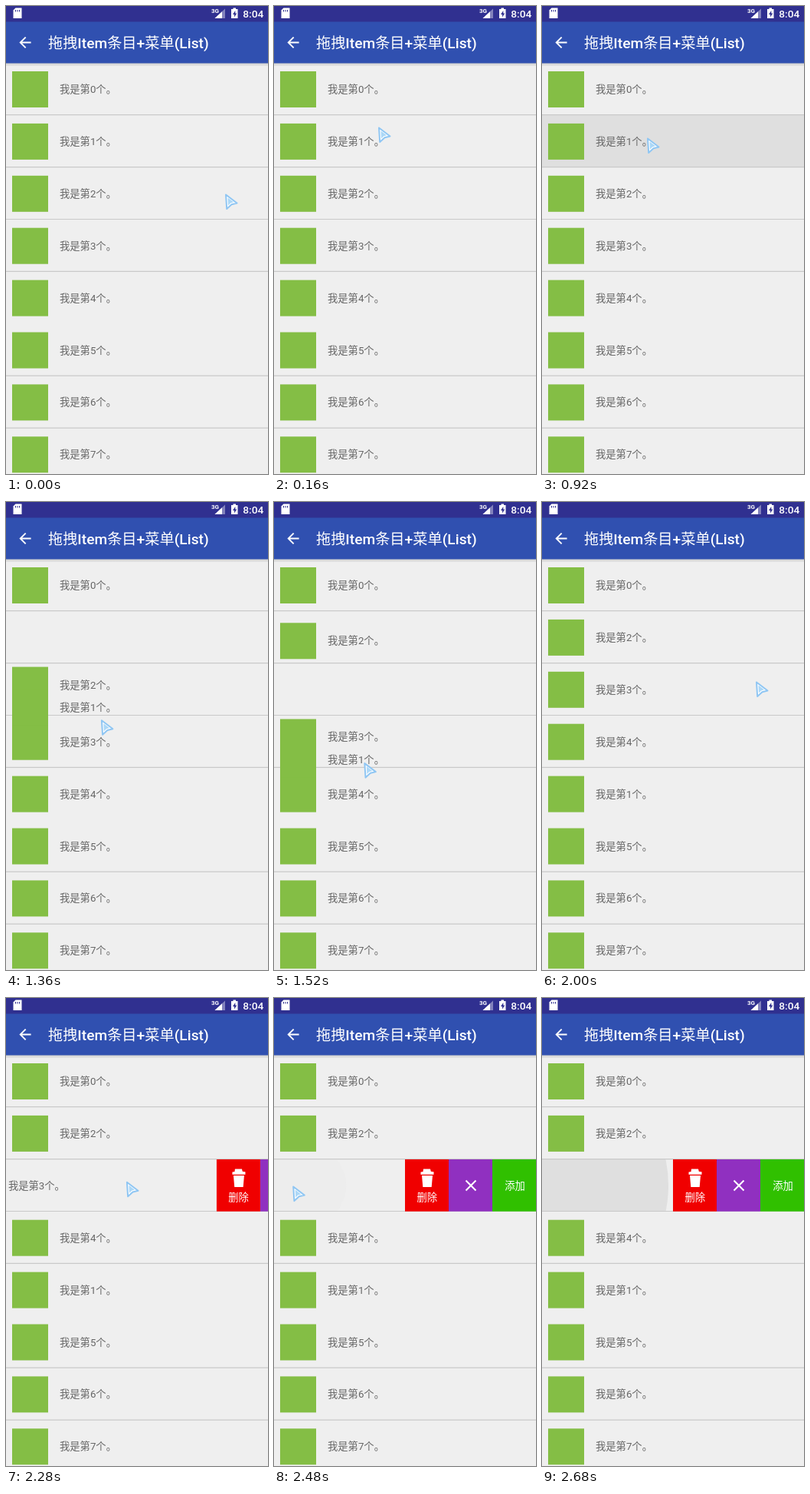
An HTML page for the animation above (3 s loop, 342 px wide and 609 px high).

```html
<!DOCTYPE html>
<html lang="zh-CN">
<head>
<meta charset="utf-8">
<style>
  html, body { margin: 0; width: 100%; height: 100%; overflow: hidden; background: #efefef; }
  svg { display: block; font-family: Roboto, "Noto Sans CJK SC", "Noto Sans CJK JP", sans-serif; }
  .white { fill: #fff; }
  .label { font-size: 13.3px; text-anchor: middle; fill: #fff; }
  #rows text { font-size: 13.3px; fill: #666; }
</style>
</head>
<body>
<svg width="342" height="609" viewBox="0 0 342 609">
  <defs>
    <linearGradient id="shade" x2="0" y2="1">
      <stop stop-color="#cfcfcf"/><stop offset="1" stop-color="#e4e4e4"/>
    </linearGradient>
    <clipPath id="row1"><rect y="141" width="342" height="69"/></clipPath>
    <clipPath id="row2"><rect y="210" width="342" height="67"/></clipPath>
  </defs>
  <rect width="342" height="609" fill="#efefef"/>
  <g fill="#dfdfdf">
    <g clip-path="url(#row1)"><circle id="press" cy="176"/></g>
    <g clip-path="url(#row2)"><circle id="tap" cy="244"/></g>
  </g>
  <path id="lines" stroke="#c9c9c9" stroke-width="1.2"/>

  <g id="menu">
    <rect width="57" height="67.700" y="210" fill="#f00000"/>
    <rect width="57" height="67.700" y="210" x="57" fill="#9030c0"/>
    <rect width="57" height="67.700" y="210" x="114" fill="#30c000"/>
    <path class="white" d="M24 222.500h9l.8 3.200 3.700.6v3.400H20.500v-3.200l3-.6zM22 231h14l-1.300 15H23.300z"/>
    <text class="label" x="28.700" y="264">删除</text>
    <path d="M79.500 237.500l13 13m0-13l-13 13" stroke="#fff" stroke-width="2"/>
    <text class="label" x="143.500" y="249">添加</text>
  </g>

  <g id="rows"></g>

  <rect y="74" width="342" height="4" fill="url(#shade)"/>
  <rect y="20" width="342" height="54.500" fill="#3050b0"/>
  <rect width="342" height="20.500" fill="#303090"/>
  <g class="white">
    <path d="M12.500 2.500H20.500V16H9.500V5.500z"/>
    <path d="M12.500 5v2.500m2.500-2.500v2.500m2.500-2.500v2.500" stroke="#303090"/>
    <text x="268" y="9" font-size="8" font-weight="700">3G</text>
    <path d="M286 3.500V16H272.500z" fill-opacity=".4"/>
    <path d="M282 7.300V16H272.500z"/>
    <path d="M296.500 2.500h3.500v1.500h2.500V16h-8.500V4h2.500z"/>
    <path d="M299.300 6l-3.300 5h2v3.500l3.300-5h-2z" fill="#303090"/>
    <text x="309.300" y="14.500" font-size="13.700" font-weight="500">8:04</text>
    <path transform="translate(13.600 36.100) scale(.95)" d="M20 11H7.830l5.590-5.590L12 4l-8 8 8 8 1.410-1.410L7.830 13H20z"/>
    <text x="55" y="55" font-size="19.200" font-weight="500">拖拽Item条目+菜单(List)</text>
  </g>

  <g id="cursor" stroke-linejoin="round">
    <path d="M1 1.500L15.500 12.500 8.500 14.200 2.200 20z" fill="#fff" stroke="#8fc6f3" stroke-width="2"/>
    <path d="M3.500 5.500L11 11.300 7 12.500 4 15.500z" fill="#acd8f7"/>
  </g>
</svg>
<script>
const $ = id => document.getElementById(id);
const PITCH = 67.9, LOOP = 3000, STEP = 40;
const DRAG_START = 1146, SWAP_EVERY = 160, SETTLE = 250, DROP = 1720;

// The divider below row 4 is absent.
let lines = '';
for (let i = 0; i < 7; i++) if (i !== 4) lines += `M0 ${141.7 + PITCH * i}h342`;
$('lines').setAttribute('d', lines);

// Each row is drawn around its own vertical centre; the dragged row 1 lies on top.
const rows = [];
for (const i of [0, 2, 3, 4, 5, 6, 7, 1]) {
  $('rows').insertAdjacentHTML('beforeend',
    `<g><rect x="8" y="-23" width="47" height="47" fill="#84be45"/><text x="70" y="5">我是第${i}个。</text></g>`);
  rows[i] = $('rows').lastElementChild;
}

const clamp = (v, lo = 0, hi = 1) => Math.min(hi, Math.max(lo, v));
const span = (t, from, to) => clamp((t - from) / (to - from));
const ease = p => (1 - Math.cos(Math.PI * p)) / 2;
const settle = (t, from) => ease(span(t, from, from + SETTLE));
const mix = (a, b, p) => a + (b - a) * p;
const place = (el, x, y) => el.setAttribute('transform', `translate(${x} ${y})`);

const moves = [
  { from: 0, to: 160, x: 136, y: 157 },
  { from: 880, to: 920, x: 137, y: 171 },
  { from: 1040, to: 1650, x: 112, y: 384 },
  { from: DROP, to: 2000, x: 279, y: 233 },
  { from: 2160, to: 2680, x: -20, y: 246, slow: 2 },
];

function cursorAt(t) {
  let x = 286, y = 244;
  for (const m of moves) {
    const p = 1 - (1 - span(t, m.from, m.to)) ** (m.slow || 1);
    x = mix(x, m.x, p);
    y = mix(y, m.y, p);
  }
  return [x, y];
}

// Rows 2 to 4 step up one slot each time the dragged row has passed them.
function rowShift(i, t) {
  if (i === 1) {
    const held = Math.max(0, Math.min(t, 1680) - DRAG_START) * PITCH / SWAP_EVERY;
    return mix(held, 3 * PITCH, settle(t, DROP));
  }
  return i > 1 && i < 5 ? -PITCH * settle(t, DRAG_START + SWAP_EVERY * (i - 1) + 5) : 0;
}

function ripple(id, x, r, opacity) {
  $(id).setAttribute('cx', x);
  $(id).setAttribute('r', r);
  $(id).setAttribute('opacity', opacity);
}

function draw(t) {
  const [x, y] = cursorAt(t);
  const swipe = t < 2160 ? 0 : clamp(224 - x, 0, 171);

  rows.forEach((row, i) => place(row, i === 3 ? -swipe : 0, 108 + PITCH * i + rowShift(i, t)));
  place($('menu'), 342 - swipe, 0);
  place($('cursor'), x, y);

  const press = span(t, 360, 880), tap = span(t, 2440, 2680);
  ripple('press', mix(137, 171, press), mix(30, 180, press), press * (1 - span(t, 1040, 1200)));
  ripple('tap', mix(50, 0, tap), mix(30, 165, tap), tap);
}

let start;
function tick(now) {
  start ??= now;
  draw(Math.floor((now - start) % LOOP / STEP) * STEP);
  requestAnimationFrame(tick);
}
draw(0);
requestAnimationFrame(tick);
</script>
</body>
</html>
```
